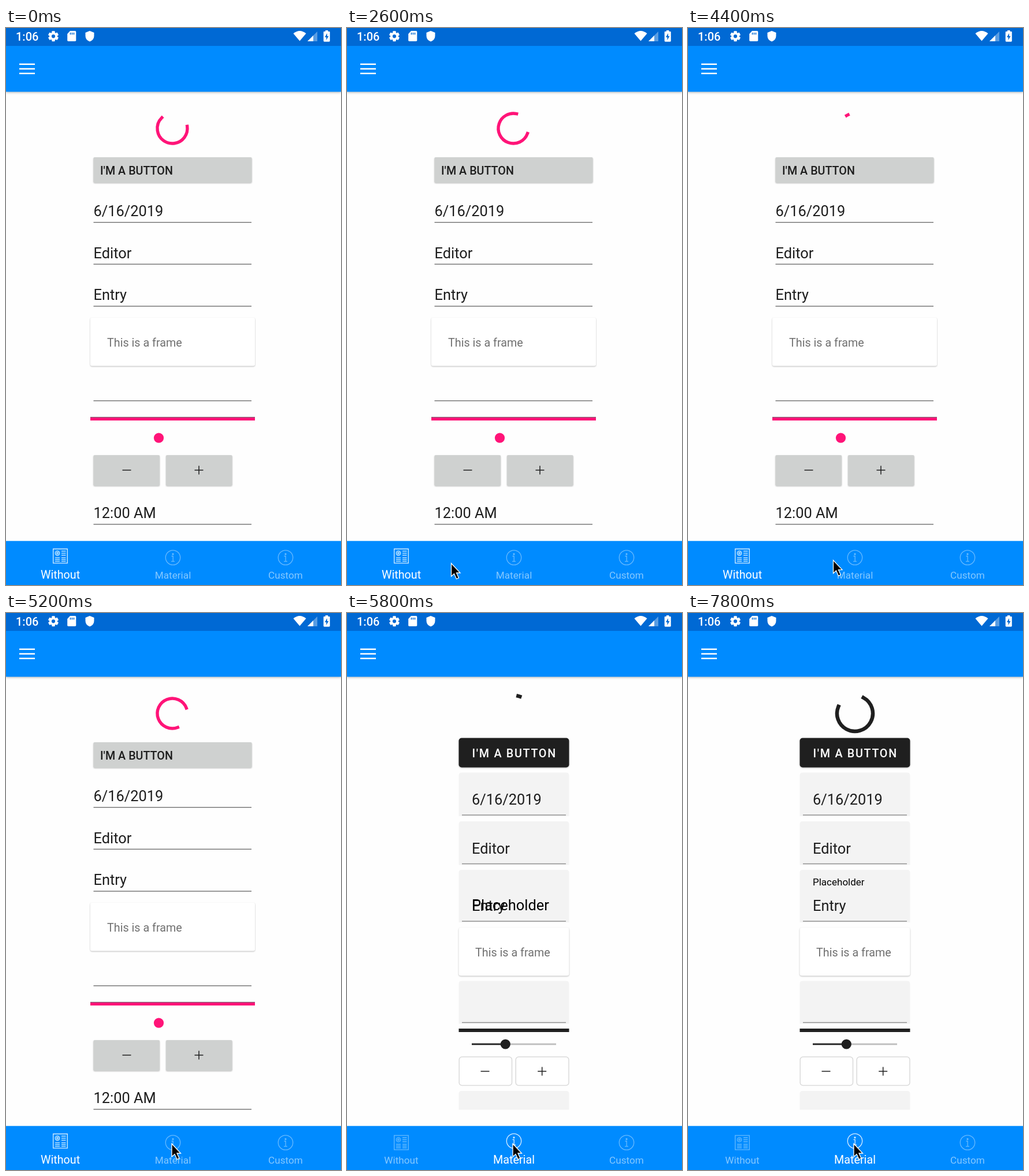
Animation, 580 px wide and 965 px high, one loop 8000 ms. Source, as an HTML page:

```html
<!DOCTYPE html>
<html lang="en">
<head>
<meta charset="utf-8">
<style>
  html, body { margin: 0; width: 100%; height: 100%; overflow: hidden; background: #fefefe; }
  svg { display: block; width: 100%; height: 100%; }
  text { font-family: Roboto, sans-serif; font-size: 25.4px; fill: #1d1d1d; white-space: pre; }
  .small { font-size: 19.74px; }
  .medium { font-weight: 500; }
  .grey { fill: #707070; }
  .raised { filter: drop-shadow(0 1.5px 1px rgba(0,0,0,.27)); }
  .spinner { fill: none; stroke-linecap: square; }
  .icon { fill: none; stroke: #fff; stroke-width: 1.3; }
  .tab text { fill: #fff; text-anchor: middle; }
</style>
</head>
<body>
<svg id="stage" viewBox="0 0 580 965"></svg>
<script>
const LOOP = 8000, STEP = 200, SWITCH = 5700;
const BLUE = '#008bff', PINK = '#ff1478', DARK = '#1f1f1f', BUTTON = '#cfd1d0';
const stage = document.getElementById('stage');

const rect = (x, y, w, h, fill, extra = '') =>
  `<rect x="${x}" y="${y}" width="${w}" height="${h}" fill="${fill}" ${extra}/>`;
const text = (x, y, label, extra = '') => `<text x="${x}" y="${y}" ${extra}>${label}</text>`;
const path = (d, extra = '') => `<path d="${d}" ${extra}/>`;
const dot = (x, y, r, fill) => `<circle cx="${x}" cy="${y}" r="${r}" fill="${fill}"/>`;
const rule = (x, y, w, color) => rect(x, y - .7, w, 1.4, color);
const sign = (x, y, plus) =>
  path(`M${x - 7.5} ${y}h15` + (plus ? `M${x} ${y - 7.5}v15` : ''), `stroke="${DARK}" stroke-width="1.5"`);
const spinner = (id, x, r, width, color) =>
  `<circle id="${id}" class="spinner" cx="${x}" cy="174" r="${r}" stroke="${color}" stroke-width="${width}" pathLength="360"/>`;

function statusBar() {
  let gear = '';
  for (let a = 0; a < 360; a += 60) gear += rect(79.3, 5.3, 5.4, 5, '#fff', `rx="1" transform="rotate(${a} 82 14.3)"`);
  return rect(0, 0, 580, 31, '#0069d4') +
    text(17, 22, '1:06', 'class="medium" style="font-size:20px;fill:#fff"') +
    gear + `<circle cx="82" cy="14.3" r="5" fill="none" stroke="#fff" stroke-width="3.8"/>` +
    path('M111 5h8.500q1.800 0 1.800 1.800v14.500q0 1.800-1.800 1.800h-11.500q-1.800 0-1.800-1.800v-11z', 'fill="#fff"') +
    path('M111.500 8v3.500M114.500 8v3.500M117.500 8v3.500', 'stroke="#0069d4" stroke-width="1.500"') +
    path('M145 5l7.500 3v5.500q0 7-7.500 10q-7.500-3-7.500-10v-5.500z', 'fill="#fff"') +
    path('M497.500 9.500q11-9 22 0l-11 13z', 'fill="#fff"') +
    path('M539 6v17h-17z', 'fill="#fff" opacity=".35"') +
    path('M532 13v10h-10z', 'fill="#fff"') +
    path('M553 4h4.500v2h2q1.300 0 1.300 1.300v15q0 1.400-1.300 1.400h-8.500q-1.300 0-1.300-1.400v-15q0-1.300 1.300-1.300h2z', 'fill="#fff"') +
    path('M556 9l-4 7h2.500v5l4-7h-2.500z', 'fill="#0069d4"');
}

function header() {
  return rect(0, 20, 580, 90.5, BLUE, 'style="filter:drop-shadow(0 1.500px 2px rgba(0,0,0,.3))"') + statusBar() +
    [61.5, 69.5, 77.5].map(y => rect(23, y, 27, 2.5, '#fff')).join('');
}

function plainPage() {
  const field = (y, label) => text(151.5, y - 10.7, label) + rule(151.5, y, 273.5, '#707070');
  const button = (x, y, w, h) => rect(x, y, w, h, BUTTON, 'rx="2" class="raised"');
  return spinner('plainSpinner', 288, 26, 5.4, PINK) +
    button(151.5, 224, 274, 44) + text(163, 254, "I'M A BUTTON", 'class="small medium"') +
    field(336.7, '6/16/2019') + field(409.2, 'Editor') + field(482, 'Entry') +
    rect(146, 502, 285, 83.5, '#fff', 'rx="3" class="raised"') +
    text(175, 552, 'This is a frame', 'class="small grey"') +
    field(645.8, '') +
    rect(146, 674, 285, 6, PINK) + rect(146, 673.8, 285, 1.2, '#80506a') +
    dot(264.5, 710.2, 8.6, PINK) +
    button(151.5, 740, 114.5, 53) + button(277, 740, 114.5, 53) +
    sign(209, 766) + sign(334, 766, true) + field(859.8, '12:00 AM');
}

function materialPage() {
  const field = (y, h, label) =>
    path(`M193.500 ${y + h}v${5 - h}q0-5 5-5h181q5 0 5 5v${h - 5}z`, 'fill="#f3f3f3"') +
    rule(199, y + h - 2, 180, '#8c8c8c') + text(216, y + h - 20, label);
  const outline = (x, w) => rect(x, 769, w, 49.5, '#fff', 'rx="5" stroke="#dadada" stroke-width="1.500"');
  return spinner('darkSpinner', 289, 31, 6.5, DARK) +
    rect(193.5, 216.5, 191, 51, DARK, 'rx="5" class="raised"') +
    text(216.5, 250, "I'M A BUTTON", 'class="small medium" style="fill:#fff;letter-spacing:1.700px"') +
    field(276.5, 75.5, '6/16/2019') + field(361, 75.5, 'Editor') + field(445, 91, 'Entry') +
    text(0, 0, 'Placeholder', 'id="hint" style="fill:#000"') +
    rect(193.5, 545, 191, 83.5, '#fff', 'rx="4" class="raised"') +
    text(222, 594.5, 'This is a frame', 'class="small grey"') +
    field(637.5, 74, '') + rect(193.5, 720, 191, 6, DARK) +
    rect(275, 745.6, 87, 2.8, '#bdbdbd') + rect(216, 745.6, 59, 2.8, DARK) + dot(274.3, 747, 8.6, DARK) +
    outline(194.2, 91.3) + outline(292.2, 91.8) + sign(239, 794) + sign(337.7, 794, true) +
    path('M193.500 860.500v-27.500q0-5 5-5h181q5 0 5 5v27.500z', 'fill="#f3f3f3"');
}

const newsIcon =
  path('M-12.300-12.300h24.600v24.600h-24.600zM2-8.500h7.500M2-5h7.500M2-1.500h7.500M-9 3h8M2 3h7.500M-9 6h8M2 6h7.500M-9 9h8M2 9h7.500') +
  `<circle cx="-5" cy="-5" r="3.700"/><circle cx="-5" cy="-5" r="1.400"/>`;
const infoIcon = `<circle r="12.700"/>` + path('M-2.500-2.500h2.700v9M-3 6.700h6') + dot(0, -6, 1, '#fff');

function tab(x, label, icon, selected) {
  return `<g class="tab"><g class="icon" opacity="${selected ? .85 : .4}" transform="translate(${x} ${selected ? 914.8 : 917.5})">${icon}</g>` +
    text(x, 954, label, `style="font-size:${selected ? 19.74 : 17.2}px" opacity="${selected ? 1 : .52}"`) + '</g>';
}

const navBar = selected => rect(0, 888.7, 580, 77, BLUE) +
  ['Without', 'Material', 'Custom'].map((label, i) =>
    tab(94 + 195 * i, label, i ? infoIcon : newsIcon, i === selected)).join('');

stage.innerHTML = header() +
  `<g id="plain">${plainPage()}${navBar(0)}</g><g id="material">${materialPage()}${navBar(1)}</g>` +
  path('M0 0v22.500l5-4.500l4 9l4-1.800l-4-8.700h6.500z', 'id="cursor" fill="#000" stroke="#fff" stroke-width="1.300"');

const [plain, material, plainSpinner, darkSpinner, hint, cursor] =
  ['plain', 'material', 'plainSpinner', 'darkSpinner', 'hint', 'cursor'].map(id => document.getElementById(id));

// Bezier (0,0) (.2,0) (.1,1) (.5,1): y for a given x.
function trim(x) {
  if (x <= 0) return 0;
  if (x >= .5) return 1;
  let low = 0, high = 1;
  for (let i = 0; i < 24; i++) {
    const u = (low + high) / 2, v = 1 - u;
    if (.6 * v * v * u + .3 * v * u * u + .5 * u ** 3 < x) low = u; else high = u;
  }
  return low * low * (3 - 2 * low);
}

function spin(node, cycles, rotation) {
  const phase = cycles % 1;
  const tail = 270 * trim(phase - .5), head = 270 * trim(phase);
  node.setAttribute('stroke-dasharray', `${Math.max(.1, head - tail)} 400`);
  node.setAttribute('transform', `rotate(${rotation + 90 * phase + tail - 90} ${node.getAttribute('cx')} 174)`);
}

// time, x, y
const cursorPath = [
  [400, 560, 940], [800, 300, 950], [1200, 110, 948], [1600, 144.5, 946.5],
  [2400, 180.5, 927.5], [3600, 180.5, 927.5], [4800, 287, 919.5], [LOOP, 287, 919.5]
];

function moveCursor(t) {
  const next = cursorPath.findIndex(key => key[0] > t);
  cursor.style.display = next > 0 ? '' : 'none';
  if (next < 1) return;
  const [t0, x0, y0] = cursorPath[next - 1], [t1, x1, y1] = cursorPath[next];
  const k = (t - t0) / (t1 - t0);
  cursor.setAttribute('transform', `translate(${x0 + (x1 - x0) * k} ${y0 + (y1 - y0) * k})`);
}

function draw(t) {
  const switched = t >= SWITCH;
  plain.style.display = switched ? 'none' : '';
  material.style.display = switched ? '' : 'none';
  if (switched) {
    const age = Math.max(0, t - 5740);
    spin(darkSpinner, age / 1333, age * 720 / 4444);
    const lift = Math.min(1, Math.max(0, (t - 5830) / 167));
    hint.setAttribute('x', 216);
    hint.setAttribute('y', 515 - 43 * lift);
    hint.style.fontSize = 25.4 - 8.4 * lift + 'px';
  } else {
    spin(plainSpinner, t / 1333 + .6, t * 720 / 4444 - 8.5);
  }
  moveCursor(t);
}

function tick() {
  draw(Math.floor(performance.now() % LOOP / STEP) * STEP);
  requestAnimationFrame(tick);
}
tick();
</script>
</body>
</html>
```
